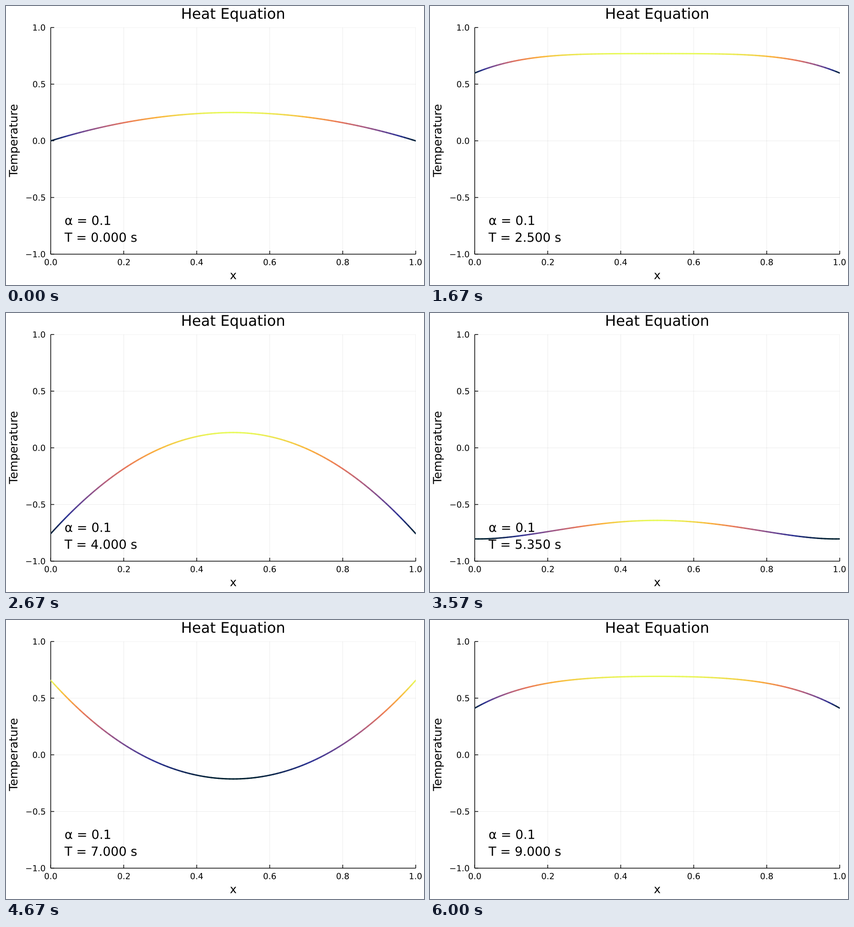
Write a matplotlib script that moves like this. It is 917 by 611 pixels and loops after 6.03 s.

```python
import numpy as np
import matplotlib.pyplot as plt
from matplotlib.animation import FuncAnimation
from matplotlib.collections import LineCollection
from matplotlib.colors import LinearSegmentedColormap
from matplotlib.patches import PathPatch, Rectangle
from matplotlib.textpath import TextPath
from matplotlib.transforms import Affine2D

plt.rcParams["font.family"] = "DejaVu Sans"

W, H, DPI = 917, 611, 100
PT = 72 / DPI                                   # points per pixel
LEFT, RIGHT, TOP, BOTTOM = 98.2, 898.8, 47.1, 543.5
FONT = 2.295                                    # pixels per nominal font point
ALPHA, DT = 0.1, 0.05

THERMAL = LinearSegmentedColormap.from_list("thermal", [
    "#042333", "#2c3395", "#744992", "#b15f82", "#eb7958", "#fbb43d", "#e8fa5b"])

fig = plt.figure(figsize=(W / DPI, H / DPI), dpi=DPI, facecolor="white")
ax = fig.add_axes([0, 0, 1, 1])
ax.set_xlim(0, W)
ax.set_ylim(H, 0)
ax.axis("off")


def px(x):
    return LEFT + (RIGHT - LEFT) * x


def py(u):
    return BOTTOM + (TOP - BOTTOM) * (u + 1) / 2


def outline(s, size):
    return TextPath((0, 0), s, size=size * FONT)


def label(x, y, s, size, align="center", angle=0):
    """Text as outlines, so that it keeps its sub-pixel position."""
    path = outline(s, size)
    box = path.get_extents()
    anchor = {"left": 0, "center": (box.x0 + box.x1) / 2, "right": box.x1}[align]
    place = (Affine2D().translate(-anchor, 0).rotate_deg(angle)
             .scale(1, -1).translate(x, y))
    art = PathPatch(path, facecolor="black", linewidth=0, zorder=5, snap=False,
                    transform=place + ax.transData)
    return ax.add_artist(art)


def lines(segs, width, color, z, cap="butt"):
    art = LineCollection(segs, linewidths=width * PT, colors=color,
                         capstyle=cap, zorder=z, snap=False)
    ax.add_collection(art, autolim=False)
    return art


# Temperature: periodic response to sin(t) at both ends plus decaying modes
x = np.linspace(0, 1, 101)
k = np.sqrt(1j / ALPHA)
shape = np.cosh(k * (x - 0.5)) / np.cosh(k / 2)
n = np.arange(1, 60, 2)
modes = np.sin(np.pi * np.outer(n, x))
coef = 2 * modes @ (x * (1 - x) - shape.imag) * (x[1] - x[0])


def temperature(t):
    decay = np.exp(-ALPHA * (n * np.pi) ** 2 * t)
    return (np.exp(1j * t) * shape).imag + (coef * decay) @ modes


# Grid, axes and ticks
xt = np.linspace(0, 1, 6)
yt = np.linspace(-1, 1, 5)
plot_area = Rectangle((LEFT, TOP), RIGHT - LEFT, BOTTOM - TOP,
                      transform=ax.transData)
grid = lines([[(px(v), TOP), (px(v), BOTTOM)] for v in xt]
             + [[(LEFT, py(v)), (RIGHT, py(v))] for v in yt],
             0.76, (0, 0, 0, 0.1), 1)
grid.set_clip_path(plot_area)
lines([[(LEFT, BOTTOM), (RIGHT, BOTTOM)], [(LEFT, TOP), (LEFT, BOTTOM)]]
      + [[(px(v), BOTTOM), (px(v), BOTTOM - 7.5)] for v in xt]
      + [[(LEFT, py(v)), (LEFT + 7.5, py(v))] for v in yt],
      1.53, "black", 2)

for v in xt:
    label(px(v), 567.5, f"{v:.1f}", 8)
for v in yt:
    label(85.7, py(v) + 6.7, f"{v:.1f}".replace("-", "−"), 8, "right")

label((LEFT + RIGHT) / 2, 28, "Heat Equation", 14)
label((LEFT + RIGHT) / 2, 598.2, "x", 11)
label(25, (TOP + BOTTOM) / 2, "Temperature", 11, angle=90)
label(128.5, 479.4, f"α = {ALPHA}", 12, "left")
clock = label(128.5, 516.4, "T = 0.000 s", 12, "left")

curve = lines([], 3.06, "black", 3, cap="round")
curve.set_clip_path(plot_area)


def step_at(i):
    # steps last a thirtieth of a second, on a 10 ms clock
    ms = 10 * ((15 * i + 10) // 10)
    return int((ms + 4) * 0.03)


def update(i):
    t = step_at(i) * DT
    u = temperature(t)
    pts = np.column_stack([px(x), py(u)])
    curve.set_segments(np.stack([pts[:-1], pts[1:]], axis=1))
    level = (u[:-1] + u[1:]) / 2
    curve.set_color(THERMAL((level - u.min()) / np.ptp(u)))
    clock.set_path(outline(f"T = {t:.3f} s", 12))
    return curve, clock


anim = FuncAnimation(fig, update, frames=402, interval=15, repeat=True,
                     repeat_delay=0, blit=False)
plt.show()
```
